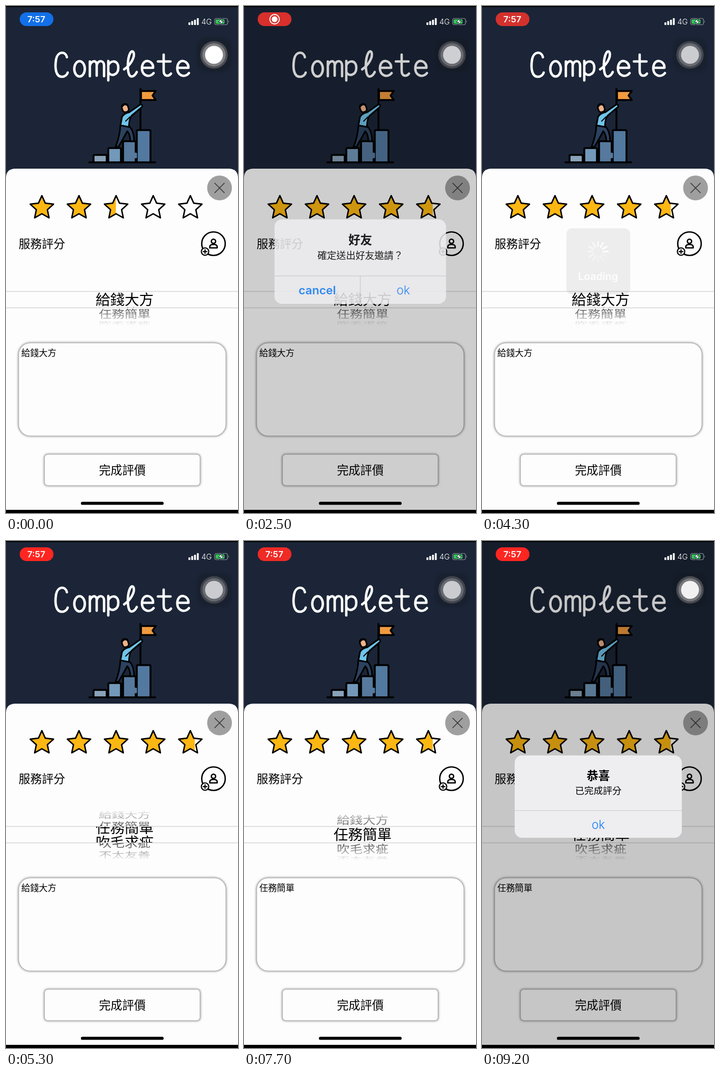
Write an HTML page that moves like this. It is 440 by 960 pixels and loops after 9.3 s.

```html
<!DOCTYPE html>
<html lang="zh-Hant">
<head>
<meta charset="utf-8">
<title>Complete</title>
<style>
  html, body { margin: 0; width: 100%; height: 100%; overflow: hidden; background: #000; }
  svg { display: block; width: 440px; height: 960px; }
  text { font-family: "Noto Sans CJK TC", "Noto Sans CJK", sans-serif; font-weight: 350; }
  .ui { font-family: Inter, sans-serif; }
  .bold { font-weight: 600; }
  .mid { text-anchor: middle; }
  .line { fill: none; stroke: #000; stroke-linecap: round; stroke-linejoin: round; }
  .box { fill: #fefdfe; stroke: #b4b3b5; stroke-width: 1.2; filter: drop-shadow(0 0 2px #0008); }
  .blue { fill: #157efb; font-size: 22.5px; }
</style>
</head>
<body>
<svg viewBox="0 0 440 960">
  <defs>
    <path id="star"/>
    <clipPath id="rated"><rect id="ratedBox" y="350" height="60"/></clipPath>
    <clipPath id="band"><rect y="541" width="440" height="30"/></clipPath>
    <clipPath id="rest"><path d="M0 505H440V540H0ZM0 572H440V606H0Z"/></clipPath>
    <linearGradient id="fade" x2="0" y2="1">
      <stop offset="0" stop-color="#000"/><stop offset=".35" stop-color="#aaa"/>
      <stop offset=".68" stop-color="#aaa"/><stop offset="1" stop-color="#000"/>
    </linearGradient>
    <mask id="wheel" maskUnits="userSpaceOnUse" x="0" y="505" width="440" height="101">
      <rect y="507" width="440" height="98" fill="url(#fade)"/>
    </mask>
  </defs>

  <rect y="2" width="440" height="952" fill="#1b2537"/>

  <g role="img" aria-label="Complete" class="line" style="stroke:#fff" stroke-width="4.600">
    <path d="M115.500 97C113 85 98 85 95 101C92 119 95 134 106 134C112 134 116 130 117 126"/>
    <ellipse cx="139.500" cy="119" rx="10" ry="14.500"/>
    <path d="M159 105V133M159 113C162 103 171 102 172 110V132M172 112C175 102 185 102 186 112V133"/>
    <path d="M194 104V141M194 112C199 102 213 102 213 117C213 132 198 134 194 125"/>
    <path d="M224 120C236 112 245 97 242 88C238 81 232 92 231 110C231 128 234 134 239 133.500C243 133 246 129 248 125"/>
    <path id="e" d="M258 117H279C280 104 261 97 258 115C256 132 272 137 280 127"/>
    <path d="M299 92V122C299 134 308 134 313 128M288 105H312"/>
    <use href="#e" x="67"/>
  </g>

  <g class="line" stroke-width="3.600">
    <path d="M256 161H284L278 169.500L284 178H256Z" fill="#f09b40"/>
    <path d="M255 157V236"/>
    <path d="M166 296V284Q166 282 168 282H189Q191 282 191 284V296" fill="#89a3b8"/>
    <path d="M194 296V271Q194 269 196 269H216Q218 269 218 271V296" fill="#7299ba"/>
    <path d="M222 296V258Q222 256 224 256H244Q246 256 246 258V296" fill="#56799d"/>
    <path d="M248 296V237Q248 235 250 235H272Q274 235 274 237V296" fill="#5279a0"/>
    <path d="M246 280V286" stroke="#56799d" stroke-width="5"/>
    <path d="M158 296H283"/>
    <path d="M217 225L233 227Q243 236 243 256L236 256Q235 242 230 237Q222 252 213 267L208 266Q216 246 217 225Z" fill="#2b4260" stroke-width="3"/>
    <path d="M220 210Q224 203 234 201L254 187Q260 186 258 191L238 208Q234 212 233 229L217 226Z" fill="#70c4ea" stroke-width="3"/>
    <path d="M227 218L235 210" stroke-width="2"/>
    <rect x="220" y="186" width="12" height="15" rx="5.500" fill="#efb28b" stroke-width="3" transform="rotate(-18 226 193)"/>
    <path d="M220 190Q223 184 230 187" stroke-width="4"/>
  </g>

  <path d="M0 954V326Q0 308 18 308H422Q440 308 440 326V954Z" fill="#fefdfe"/>
  <circle cx="405" cy="344.500" r="23.500" fill="#a09fa0"/>
  <path d="M396 335.500L414 353.500M414 335.500L396 353.500" class="line" stroke-width="1.500" style="stroke:#333"/>

  <g id="empty" fill="#fff"></g>
  <g id="full" fill="#fdb713" clip-path="url(#rated)"></g>
  <g id="edges" class="line" stroke-width="2.700"></g>

  <text x="24" y="458" font-size="22">服務評分</text>
  <g class="line" stroke-width="2.600">
    <circle cx="393.500" cy="450" r="22.300"/>
    <circle cx="393.500" cy="445.500" r="4"/>
    <path d="M386.500 458V456Q386.500 451.500 393.500 451.500Q400.500 451.500 400.500 456V458Z"/>
    <circle cx="377.500" cy="465" r="7" fill="#fefdfe" stroke-width="2.200"/>
    <path d="M374 465H381M377.500 461.500V468.500" stroke-width="2.200"/>
  </g>

  <path d="M0 540.500H440M0 571.500H440" stroke="#d5d5d7" stroke-width="1.500"/>
  <g mask="url(#wheel)"><g id="pick" class="mid" clip-path="url(#rest)" font-size="24.500"></g></g>
  <g id="lens" class="mid" clip-path="url(#band)" font-size="27.500"></g>

  <rect class="box" x="24" y="638" width="393" height="176" rx="22"/>
  <text id="note" x="29" y="663" font-size="16.700"></text>
  <rect class="box" x="73" y="849" width="295" height="59" rx="6"/>
  <text class="mid" x="220.500" y="887" font-size="22.200">完成評價</text>

  <g id="hud">
    <rect x="160" y="421" width="121" height="125" rx="10" fill="#000" fill-opacity=".8"/>
    <g id="spin" stroke="#fff" stroke-width="3.200" stroke-linecap="round"></g>
    <text class="mid ui bold" x="220" y="519" font-size="19.500" fill="#fff">Loading</text>
  </g>

  <rect id="dim" y="2" width="440" height="952"/>
  <rect x="142" y="938.800" width="157" height="5.800" rx="2.900"/>

  <g id="alert">
    <rect x="62" y="406" width="317" height="156" rx="14" fill="#eeedef"/>
    <text id="head" class="mid bold" x="220.500" y="452" font-size="22"></text>
    <text id="body" class="mid" x="220.500" y="479" font-size="17.600"></text>
    <path id="rule" stroke="#cbcacd" stroke-width="1.200"/>
    <text id="cancel" class="mid ui blue bold" x="141" y="544.500" style="font-size:21.500px">cancel</text>
    <text id="ok" class="mid ui blue" y="544.500">ok</text>
  </g>

  <g>
    <rect id="pill" x="26" y="12" width="64" height="26" rx="13"/>
    <text id="clock" class="mid ui bold" x="57.500" y="31" font-size="16.500" fill="#fff">7:57</text>
    <g id="rec" fill="none" stroke="#fff" stroke-width="1.800">
      <circle cx="58" cy="25" r="9"/><circle cx="58" cy="25" r="5.500" fill="#fff" stroke="none"/>
    </g>
    <g fill="#fff">
      <rect x="346" y="31" width="3.600" height="5" rx="1"/><rect x="351.300" y="28.500" width="3.600" height="7.500" rx="1"/>
      <rect x="356.600" y="26" width="3.600" height="10" rx="1"/><rect x="361.900" y="23" width="3.600" height="13" rx="1"/>
      <text class="ui" x="370.500" y="35" font-size="14.500">4G</text>
    </g>
    <rect x="395.700" y="23.500" width="24.500" height="12" rx="3.500" fill="none" stroke="#8c9098" stroke-width="1.200"/>
    <rect x="397.500" y="25.300" width="17" height="8.400" rx="2" fill="#35c759"/>
    <path d="M421.800 27.500Q424 29.500 421.800 31.500Z" fill="#8c9098"/>
    <path d="M410 23L402.500 30.500H407L405.500 36L413 28.500H408.500Z" fill="#fff" stroke="#1b2537" stroke-width="1"/>
  </g>

  <g id="touch">
    <rect x="362" y="60" width="65" height="65" rx="18" fill="#15181f" fill-opacity=".35" style="filter:blur(2px)"/>
    <circle cx="394.500" cy="92.500" r="26" fill="#4c4e53"/>
    <circle cx="394.500" cy="92.500" r="22" fill="#7e7f82"/>
    <circle cx="394.500" cy="92.500" r="17" fill="#fff"/>
  </g>
</svg>

<script>
const LOOP = 9300, STEP = 100;
const $ = id => document.getElementById(id);
const items = ['給錢大方', '任務簡單', '吹毛求疵', '不太友善'];

function add(parent, tag, attrs, text = '') {
  const el = document.createElementNS('http://www.w3.org/2000/svg', tag);
  for (const k in attrs) el.setAttribute(k, attrs[k]);
  el.textContent = text;
  return $(parent).appendChild(el);
}

const ramp = (t, a, b) => Math.min(1, Math.max(0, (t - a) / (b - a)));
const smooth = (t, a, b) => { const x = ramp(t, a, b); return x * x * (3 - 2 * x); };
const easeOut = (t, a, b) => 1 - (1 - ramp(t, a, b)) ** 3;
// Share of a critically damped spring still to travel.
const spring = (t, start) => {
  const x = Math.max(0, t - start) * 0.02;
  return (1 + x) * Math.exp(-x);
};
const fade = (el, v) => el.setAttribute('opacity', v.toFixed(3));

const points = Array.from({ length: 10 }, (_, i) => {
  const r = i % 2 ? 11 : 23.2, a = i * Math.PI / 5;
  return `${(r * Math.sin(a)).toFixed(2)} ${(-r * Math.cos(a)).toFixed(2)}`;
});
$('star').setAttribute('d', `M${points.join('L')}Z`);
for (const layer of ['empty', 'full', 'edges'])
  for (let i = 0; i < 5; i++) add(layer, 'use', { href: '#star', x: 68 + i * 70.4, y: 382.3 });

const outer = items.map(s => add('pick', 'text', {}, s));
const inner = items.map(s => add('lens', 'text', { x: 225 }, s));
const spokes = Array.from({ length: 12 }, (_, i) =>
  add('spin', 'path', { d: 'M220 455V446', transform: `rotate(${i * 30} 220 465)` }));

function drawPicker(t) {
  const pos = 2 * smooth(t, 4900, 5500) - 1.25 * easeOut(t, 6100, 6500) + 0.25 * smooth(t, 6500, 6800);
  items.forEach((_, i) => {
    const d = i - pos, angle = d * 0.613, flat = Math.cos(angle);
    outer[i].setAttribute('transform',
      `translate(225 ${556 + 47.8 * Math.sin(angle)}) scale(1 ${Math.max(flat, 0.01)}) translate(0 9)`);
    outer[i].style.display = Math.abs(angle) < 1.5 ? '' : 'none';
    inner[i].setAttribute('y', 566 + d * 28);
  });
  $('note').textContent = items[t < 5800 ? 0 : t < 6900 ? 2 : 1];
}

function drawAlert(t) {
  const invite = t < 5000;
  const left = spring(t, invite ? 2330 : 8300);
  const kept = delay => invite ? spring(t, 3130 + delay) : 1;
  const scale = 1 + 0.18 * left;
  fade($('dim'), 0.22 * (1 - left) * kept(0));
  fade($('alert'), (1 - left) * kept(20));
  $('alert').setAttribute('transform', `translate(220.5 484) scale(${scale}) translate(-220.5 -484)`);
  $('head').textContent = invite ? '好友' : '恭喜';
  $('body').textContent = invite ? '確定送出好友邀請？' : '已完成評分';
  $('rule').setAttribute('d', 'M62 510.5H379' + (invite ? 'M220.5 511V562' : ''));
  $('cancel').style.display = invite ? '' : 'none';
  $('ok').setAttribute('x', invite ? 300 : 220.5);
}

function drawHud(t) {
  fade($('hud'), ramp(t, 3500, 3680) * (1 - ramp(t, 4116, 4316)));
  const lead = Math.floor(t / 83);
  spokes.forEach((s, i) => fade(s, 1 - 0.07 * ((lead - i + 1200) % 12)));
}

function drawStatus(t) {
  const red = smooth(t, 500, 800), back = smooth(t, 3120, 3400);
  const glow = (1 - Math.cos((t - 2300) * Math.PI / 1000)) / 2;
  const mix = (a, b, c) => Math.round(a + (b + (c - b) * glow - a) * red);
  $('pill').setAttribute('fill', `rgb(${mix(18, 212, 255)},${mix(112, 49, 38)},${mix(232, 45, 33)})`);
  fade($('clock'), 1 - red + red * back);
  fade($('rec'), red * (1 - back));
  fade($('touch'), 1 - 0.23 * smooth(t, 1500, 2700) + 0.17 * smooth(t, 8850, 9100));
}

function draw(t) {
  $('ratedBox').setAttribute('width', 208.5 + 149.5 * smooth(t, 400, 1500));
  drawPicker(t);
  drawAlert(t);
  drawHud(t);
  drawStatus(t);
}

const began = performance.now();
function tick() {
  const t = performance.now() - began + 20;
  draw(Math.floor(t % LOOP / STEP) * STEP);
  requestAnimationFrame(tick);
}
tick();
</script>
</body>
</html>
```
